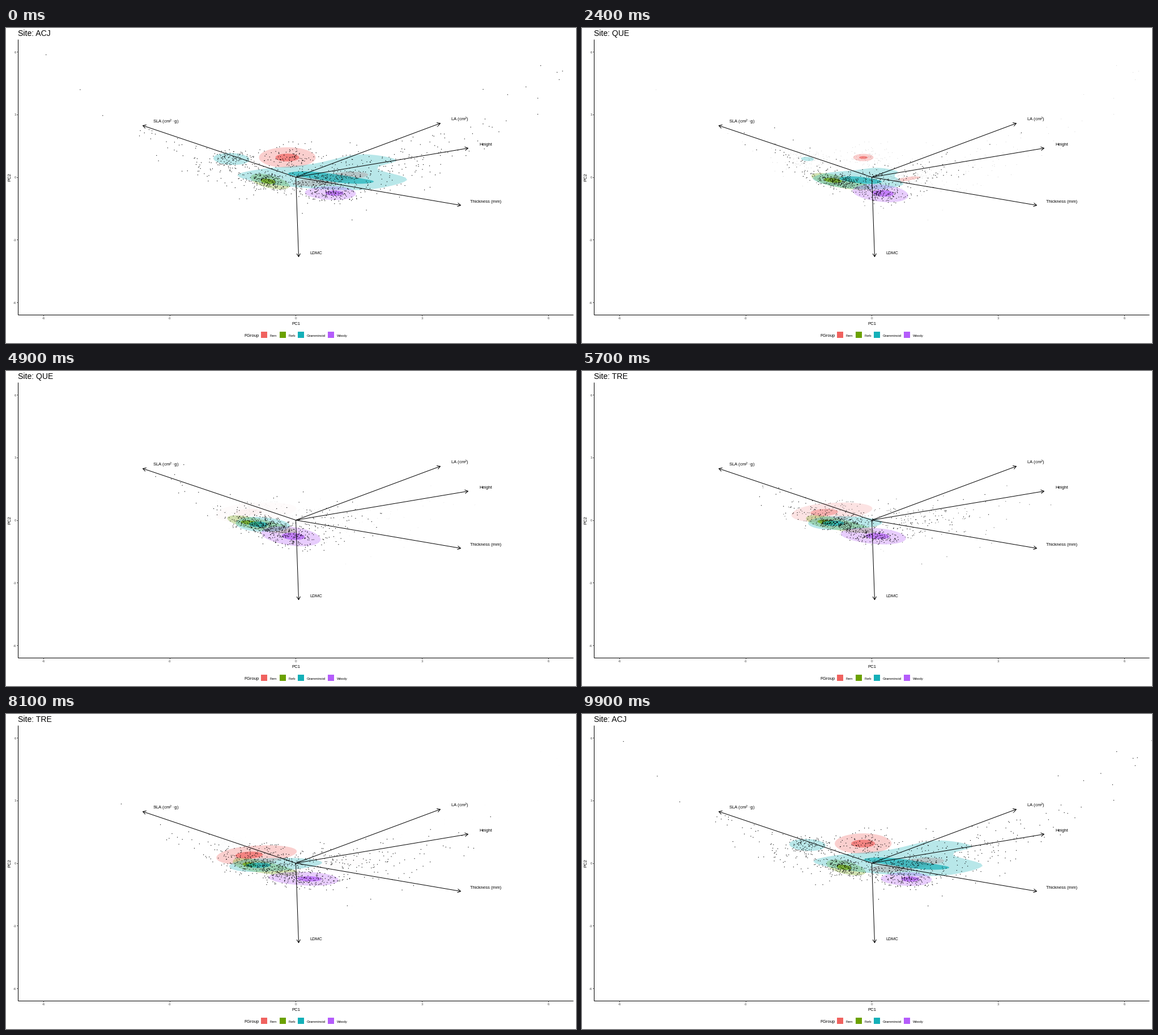
These frames come from a looping animation (1006x557 px, 10 s). A matplotlib script:

```python
import numpy as np
import matplotlib.pyplot as plt
from matplotlib.animation import FuncAnimation
from matplotlib.collections import PolyCollection
from matplotlib.colors import to_rgb

W, H, DPI = 1006, 557, 100
PX = 72 / DPI
CX, CY = 512, 264.2
plt.rcParams.update({
    "font.family": "Liberation Sans",
    "mathtext.fontset": "custom",
    "mathtext.rm": "Liberation Sans",
    "mathtext.it": "Liberation Sans",
})
COLORS = {"Fern": "#f0625f", "Forb": "#6ba100", "Gramminoid": "#14b0b8", "Woody": "#b45cfb"}
OUTER, INNER = 0.3, 0.69
rng = np.random.default_rng(11)


def mix(a, b, t):
    return a + (b - a) * t


def smooth(points, n=120):
    """Closed Catmull-Rom curve, evenly resampled from its leftmost point."""
    p = np.array(points, float)
    a, b, c, d = (np.roll(p, k, 0)[:, None] for k in (1, 0, -1, -2))
    u = np.linspace(0, 1, 16, endpoint=False)[None, :, None]
    curve = 0.5 * (2 * b + (c - a) * u + (2 * a - 5 * b + 4 * c - d) * u**2
                   + (3 * b - a - 3 * c + d) * u**3)
    curve = curve.reshape(-1, 2)
    curve = np.roll(curve, -curve[:, 0].argmin(), 0)
    curve = np.vstack([curve, curve[:1]])
    dist = np.r_[0, np.cumsum(np.hypot(*np.diff(curve, axis=0).T))]
    s = np.linspace(0, dist[-1], n, endpoint=False)
    return np.column_stack([np.interp(s, dist, curve[:, k]) for k in (0, 1)])


def egg(x, y, left, right, height, slope=0.0):
    """Oval around a density peak, reaching unequally far to each side."""
    a = np.linspace(0, 2 * np.pi, 32, endpoint=False)
    dx = -np.cos(a) * np.where(np.cos(a) > 0, left, right)
    return smooth(np.column_stack([x + dx, y - height * np.sin(a) + slope * dx]))


def peak(name, x, y, left, right, height, slope=0.0):
    """Outer contour of a group and the core inside it."""
    r = 0.42 * min(left, right)
    return {name: egg(x, y, left, right, height, slope),
            name + " core": egg(x, y, r, r, 0.38 * height, 0.5 * slope)}


def band(x0, x1, y0, y1, half):
    """Horizontal S-shaped band that steps from y0 to y1."""
    u = (1 - np.cos(np.linspace(0, np.pi, 20))) / 2
    x = mix(x0, x1, u)
    y = mix(y0, y1, u * u * (3 - 2 * u))
    h = half * np.sin(np.pi * u) ** 0.5
    return smooth(np.vstack([np.column_stack([x, y - h]),
                             np.column_stack([x, y + h])[-2:0:-1]]))


# Drawn in this order: all outer contours, then all cores.
GROUPS = {"fern low": "Fern", "fern": "Fern", "forb": "Forb", "gram left": "Gramminoid",
          "gram": "Gramminoid", "woody": "Woody"}
LAYERS = [(name, group, OUTER) for name, group in GROUPS.items()]
LAYERS += [(name + " core", group, INNER) for name, group in GROUPS.items()]

SHAPES = {
    "ACJ": {
        **peak("fern", 497, 229.5, 50, 50, 18),
        **peak("forb", 463, 271.5, 31, 38, 11.5, 0.22),
        **peak("woody", 580, 292.5, 52, 38, 12, 0.02),
        "fern low": band(508, 640, 275, 260, 9),
        "gram left": egg(398.5, 232, 32, 32, 10.5, 0.04),
        "gram": smooth([(409, 262), (450, 250), (540, 241), (625, 224), (690, 234),
                        (655, 249), (709, 268), (650, 285), (570, 286), (470, 277)]),
        "gram core": band(498, 650, 258, 272, 7),
    },
    "QUE": {
        **peak("forb", 432, 269, 42, 82, 10, 0.2),
        **peak("gram", 446, 272, 39, 51, 13, 0.06),
        **peak("woody", 505, 293, 55, 48, 17, 0.12),
    },
    "TRE": {
        **peak("fern", 428, 250.5, 58, 85, 16, -0.08),
        **peak("forb", 430, 267, 30, 89, 11, 0.18),
        **peak("gram", 443, 268, 49, 113, 11.5, -0.04),
        **peak("woody", 535, 292, 73, 52, 12, 0.04),
    },
}


def cloud(n, poly):
    """Normal scatter that follows the extent of a contour."""
    root = np.linalg.cholesky(np.cov(poly.T))
    return poly.mean(0) + 0.85 * np.clip(rng.normal(size=(n, 2)), -2.3, 2.3) @ root.T


def arm(n, reach, rise, spread):
    """Sparse tail bending upwards away from the centre."""
    u = np.abs(rng.normal(0, 0.55, n))
    return np.column_stack([508 + reach * u, 270 - rise * u**2 + rng.normal(0, spread, n)])


def scatter(site, density, left, right):
    points = {name: cloud(int(density * 110), SHAPES[site][name])
              for name in GROUPS if name in SHAPES[site]}
    for name in ("forb", "woody"):
        points[name + " core"] = cloud(int(density * 60), SHAPES[site][name])
    return {**points, "left": arm(*left), "right": arm(*right)}


POINTS = {
    "ACJ": scatter("ACJ", 0.9, (160, -260, 75, 15), (260, 300, 75, 24)),
    "QUE": scatter("QUE", 1.0, (110, -165, 42, 16), (80, 130, 0, 20)),
    "TRE": scatter("TRE", 0.9, (140, -200, 50, 14), (180, 225, 20, 23)),
}


def shapes_between(src, dst, e):
    """Shared contours morph, old ones shrink, new ones fade in."""
    a, b = SHAPES[src], SHAPES[dst]
    verts, colors = [], []
    for name, group, alpha in LAYERS:
        if name in a and name in b:
            poly, fade = mix(a[name], b[name], e), 1
        elif name in a:
            poly, fade = mix(a[name], a[name].mean(0), e), float(e < 1)
        elif name in b:
            poly, fade = b[name], e
        else:
            continue
        verts.append(poly)
        colors.append((*to_rgb(COLORS[group]), alpha * fade))
    return verts, colors


def points_between(src, dst, e):
    """The same rule for points: paired ones move, others shrink or fade in."""
    none = np.empty((0, 2))
    parts = []
    for name in dict.fromkeys([*POINTS[src], *POINTS[dst]]):
        a, b = POINTS[src].get(name, none), POINTS[dst].get(name, none)
        k = min(len(a), len(b))
        parts += [(mix(a[:k], b[:k], e), 1, 1), (a[k:], 1 - e, e < 1), (b[k:], 1, e)]
    pos = np.vstack([p for p, _, _ in parts])
    size = np.concatenate([np.full(len(p), s, float) for p, s, _ in parts])
    fade = np.concatenate([np.full(len(p), f, float) for p, _, f in parts])
    return pos, size, fade


def pose(i):
    """Site pair and sine-eased progress for a frame."""
    if i < 34:
        src, dst, p = "ACJ", "QUE", (i - 11) / 22
    elif i < 68:
        src, dst, p = "QUE", "TRE", (i - 45) / 22
    else:
        src, dst, p = "TRE", "ACJ", (i - 79) / 21
    p = np.clip(p, 0, 1)
    return src, dst, p, (1 - np.cos(np.pi * p)) / 2


fig = plt.figure(figsize=(W / DPI, H / DPI), dpi=DPI, facecolor="white")
ax = fig.add_axes([0, 0, 1, 1])
ax.set_xlim(0.5, W + 0.5)
ax.set_ylim(H + 0.5, 0.5)
ax.axis("off")


def line(xs, ys, color="black"):
    ax.plot(xs, ys, color=color, lw=PX, zorder=4, solid_capstyle="butt")


def label(x, y, text, size=7.8, color="black", ha="center", va="center_baseline", **kw):
    return ax.text(x, y, text, fontsize=size * PX, color=color, ha=ha, va=va, zorder=5, **kw)


def draw_axes():
    line([22, 22], [21, 507.5])
    line([21.5, 1002], [507.2, 507.2])
    for v in range(-6, 7, 3):
        x, y = CX + 74.25 * v, CY - 36.9 * v
        line([x, x], [507.5, 510], "#333333")
        line([19.5, 21.5], [y, y], "#333333")
        label(x, 514, str(v), 6.2, "#4d4d4d")
        label(18.5, y + 0.5, str(v), 6.2, "#4d4d4d", ha="right")
    label(CX, 522.7, "PC1")
    label(7, CY + 0.3, "PC2", rotation=90, va="center")


def draw_arrow(x, y):
    line([CX, x], [CY, y])
    barbs = np.arctan2(CY - y, CX - x) + np.radians([30, -30])
    bx, by = x + 6.5 * np.cos(barbs), y + 6.5 * np.sin(barbs)
    line([bx[0], x, bx[1]], [by[0], y, by[1]])


def draw_legend():
    label(420.5, 544.3, "FGroup", ha="left")
    for x, (name, color) in zip((450.5, 483.5, 515.5, 568.5), COLORS.items()):
        ax.add_patch(plt.Rectangle((x, 537.5), 11, 11, color=color, lw=0))
        label(x + 15.8, 544.2, name, 6.2, ha="left")


draw_axes()
draw_legend()
LOADINGS = [
    (r"SLA (cm$^2\cdot$g)", (242, 173), (259.5, 169.5)),
    (r"LA (cm$^2$)", (767, 169), (785.7, 165)),
    ("Height", (816, 213), (835.7, 209)),
    ("Thickness (mm)", (803, 314), (819.7, 310)),
    ("LDMC", (517, 405), (536.5, 401)),
]
for text, tip, anchor in LOADINGS:
    draw_arrow(*tip)
    label(*anchor, text, ha="left", va="baseline")

title = label(22, 14.5, "", 14, ha="left", va="baseline")
contours = ax.add_collection(PolyCollection([], linewidths=0, zorder=2), autolim=False)
dots = ax.scatter([], [], linewidths=0, zorder=3)


def update(i):
    src, dst, p, e = pose(i)
    verts, colors = shapes_between(src, dst, e)
    contours.set_verts(verts)
    contours.set_facecolor(colors)
    pos, size, fade = points_between(src, dst, e)
    rgba = np.zeros((len(pos), 4))
    rgba[:, 3] = fade
    dots.set_offsets(pos)
    dots.set_sizes(0.85 * size**2)
    dots.set_facecolor(rgba)
    title.set_text("Site: " + (src if p < 0.53 else dst))
    return contours, dots, title


anim = FuncAnimation(fig, update, frames=100, interval=100, repeat=True, repeat_delay=0, blit=False)
plt.show()
```
